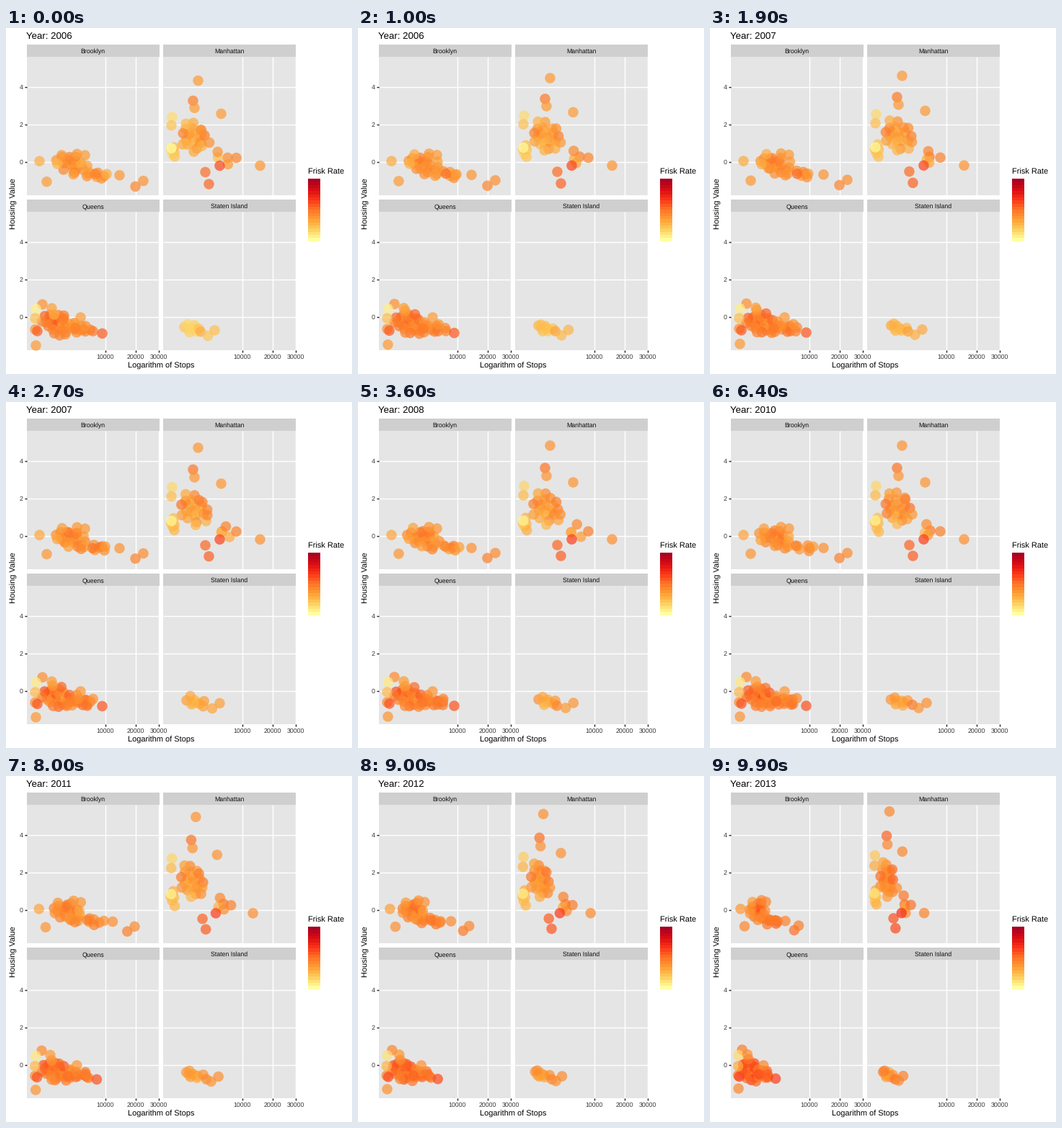
Animation, 480 px wide and 480 px high, one loop 10000 ms. Source, as a matplotlib script:

```python
import numpy as np
import matplotlib.pyplot as plt
from matplotlib.animation import FuncAnimation
from matplotlib.colors import LinearSegmentedColormap
from matplotlib.patches import Rectangle

plt.rcParams.update({"font.family": "Liberation Sans", "text.hinting": "none"})

SIZE, FRAMES, YEARS = 480, 100, np.arange(2006, 2014)
PT = 0.72  # points per pixel at 100 dpi
COLS, ROWS = (28.5, 218), (40, 255)
PANEL_W, PANEL_H, STRIP_H = 184, 192.4, 17
ZERO_X, ZERO_Y = 8.1, 145.5  # origin of the data inside a panel
BOROUGHS = (("Brooklyn", "Manhattan"), ("Queens", "Staten Island"))
RATE = LinearSegmentedColormap.from_list(
    "rate", ["#ffffa0", "#fecf5e", "#fea035", "#fd7627", "#fc3718",
             "#db0d12", "#a80020"])
GOLDEN = np.pi * (3 - 5 ** 0.5)

rng = np.random.default_rng(7)


def cloud(n, cx, cy, rx, ry, slope, rate):
    """Spread n dots evenly over a sheared ellipse."""
    k = np.arange(n)
    r = ((k + 0.5) / n) ** 0.55
    u, v = r * np.cos(k * GOLDEN), r * np.sin(k * GOLDEN)
    return np.column_stack([cx + rx * u, cy + ry * v + slope * rx * u,
                            rng.normal(rate, 5, n)])


class Borough:
    """Dots as (x, y, rate) for 2009; other years follow from shared trends."""

    def __init__(self, col, row, clouds, marks, spread06=1, rate06=-3):
        self.origin = np.array([COLS[col] + ZERO_X, ROWS[row] + ZERO_Y])
        loose = np.vstack([cloud(*c) for c in clouds])
        self.base = np.vstack([loose, marks])
        self.wander = rng.normal(0, 1, (len(YEARS), *self.base.shape))
        self.wander *= (0.05, 1.3, 4)
        self.wander[:, len(loose):] = 0
        self.spread06, self.rate06 = spread06, rate06

    def at(self, year):
        k = min(int(year) - 2006, len(YEARS) - 2)
        f = year - YEARS[k]
        noise = (1 - f) * self.wander[k] + f * self.wander[k + 1]
        spread = np.interp(year, [2006, 2009, 2011, 2012, 2013],
                           [self.spread06, 1, 1, 0.88, 0.56])
        growth = np.interp(year, [2006, 2008.5, 2011, 2013], [0.9, 1, 1, 1.09])
        shift = np.interp(year, [2006, 2009, 2012, 2013],
                          [self.rate06, 0, 0, 5])
        dx, dy = (self.base[:, :2] - self.origin).T
        x = self.origin[0] + dx * spread * (1 + noise[:, 0])
        y = self.origin[1] + dy * np.where(dy < 0, growth, 1 / growth)
        rate = self.base[:, 2] + noise[:, 2] + shift
        return np.column_stack([x, y + noise[:, 1], np.clip(rate, 0, 100)])


boroughs = [
    Borough(0, 0,
            [(25, 91, 189, 27, 13, 0.3, 44), (6, 131, 202, 14, 5, 0.1, 47)],
            [(46, 184, 32), (56, 210, 38), (98, 173, 38), (109, 175, 38),
             (157, 202, 40), (179, 216, 46), (190, 209, 42)]),
    Borough(1, 0,
            [(23, 261, 147, 20, 24, 0.3, 36), (5, 232, 169, 4, 14, 0, 22),
             (4, 301, 177, 8, 11, 0.2, 40)],
            [(266, 60, 38), (259, 91, 50), (261, 102, 38), (298, 111, 38),
             (230, 116, 15), (229, 129, 24), (229, 164, 3), (276, 198, 55),
             (281, 213, 57), (296, 190, 65), (319, 179, 46), (352, 190, 40)]),
    Borough(0, 1,
            [(31, 73, 409, 24, 15, 0.2, 47), (11, 106, 415, 17, 6, 0.15, 50)],
            [(50, 381, 42), (41, 388, 8), (63, 387, 36), (41, 436, 38),
             (40, 416, 42), (43, 418, 60), (40, 402, 25), (103, 401, 38),
             (133, 421, 60)]),
    Borough(1, 1,
            [(9, 263, 415, 18, 5, 0.2, 38)],
            [(289, 424, 38), (300, 417, 40)], spread06=0.85, rate06=-18),
]

fig = plt.figure(figsize=(4.8, 4.8), dpi=100, facecolor="white")
ax = fig.add_axes([0, 0, 1, 1])
ax.set(xlim=(0, SIZE), ylim=(SIZE, 0))
ax.axis("off")


def box(x, y, w, h, color):
    ax.add_patch(Rectangle((x, y), w, h, fc=color, lw=0))


def line(x0, y0, x1, y1, color):
    ax.plot([x0, x1], [y0, y1], color=color, lw=1.42 * PT,
            solid_capstyle="butt", zorder=1.5)


def label(x, y, s, px, color="black", **kw):
    return ax.text(x, y, s, fontsize=px * PT, color=color, **kw)


for row, top in enumerate(ROWS):
    for col, left in enumerate(COLS):
        right, bottom = left + PANEL_W, top + PANEL_H
        box(left, top - STRIP_H, PANEL_W, STRIP_H, "#cfcfcf")
        box(left, top, PANEL_W, PANEL_H, "#e5e5e5")
        label(left + PANEL_W / 2, top - 5, BOROUGHS[row][col], 8.8, "#0d0d0d",
              ha="center")
        for value in (0, 2, 4):
            y = top + ZERO_Y - 26 * value
            line(left, y, right, y, "white")
            if col == 0:
                line(left - 2.75, y, left, y, "#1f1f1f")
                label(left - 4.8, y + 3.2, value, 8.8, "#363636", ha="right")
        for stops in (10000, 20000, 30000):
            x = left + ZERO_X + 1.014 * np.sqrt(stops)
            line(x, top, x, bottom, "white")
            if row == 1:
                line(x, bottom, x, bottom + 2.75, "#1f1f1f")
                label(x, bottom + 12, stops, 8.8, "#363636", ha="center")

label(215.2, 472, "Logarithm of Stops", 11, ha="center")
label(11.3, 244, "Housing Value", 11, ha="center", va="center", rotation=90)
label(419, 203, "Frisk Rate", 11)
STEPS, BAR_TOP, BAR_H = 20, 209, 86.8
for k in range(STEPS):
    y = BAR_TOP + BAR_H * k / STEPS
    box(419, y, 17.3, BAR_TOP + BAR_H - y, RATE(1 - k / (STEPS - 1)))

title = label(28.5, 15, "", 13.2)
dots = ax.scatter([], [], s=(14.5 * PT) ** 2, lw=0, zorder=3)


def update(i):
    year = 2006 + 7 * i / (FRAMES - 1)
    now = np.vstack([b.at(year) for b in boroughs])
    dots.set_offsets(now[:, :2] + 0.5)
    dots.set_facecolor(RATE(now[:, 2] / 100, alpha=0.7))
    title.set_text(f"Year: {int(year)}")
    return dots, title


anim = FuncAnimation(fig, update, frames=FRAMES, interval=100, repeat=True,
                     repeat_delay=0)
plt.show()
```
